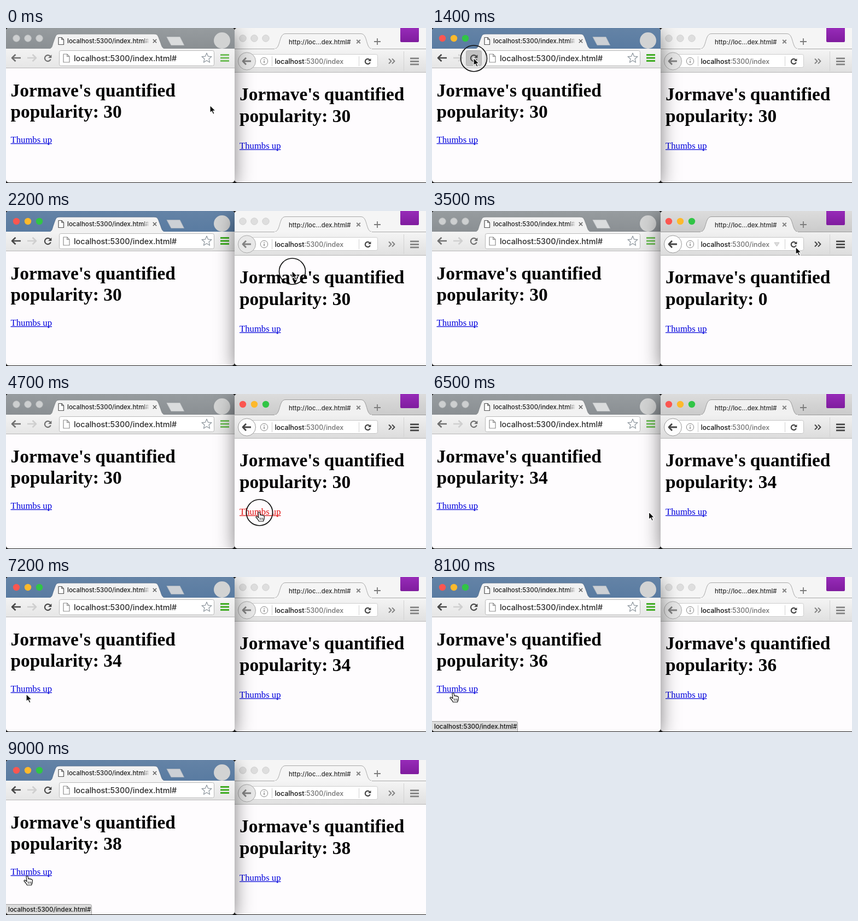
Write an HTML page with a canvas that moves like this. It is 768 px wide and 285 px high and loops after 9100 ms.

```html
<!DOCTYPE html>
<html lang="en">
<head>
<meta charset="utf-8">
<title>Quantified popularity</title>
<style>
html, body { margin: 0; width: 100%; height: 100%; overflow: hidden; background: #222; }
canvas { display: block; width: 768px; height: 285px; }
</style>
</head>
<body>
<canvas id="stage" width="768" height="285"></canvas>
<script>
const g = document.getElementById('stage').getContext('2d');
const LOOP = 9100, STEP = 100;
const UI = 'Inter, Roboto, sans-serif';
const SERIF = '"Liberation Serif", "Times New Roman", serif';
const URL_TEXT = 'localhost:5300/index.html#';
const PAPER = '#fefcfe';

// time, x, y
const PATH = [
  [300, 373, 142], [1000, 76, 55], [1700, 76, 55], [2100, 523, 110],
  [2400, 523, 110], [3200, 665, 66], [3800, 665, 66], [4500, 463, 217],
  [6400, 463, 217], [6800, 37, 215], [7200, 37, 215], [7400, 39, 213]
];
const RIGHT_VOTES = [4700, 5200, 5700, 6200];
const LEFT_VOTES = [7500, 7900, 8300, 8700];
const VOTES = RIGHT_VOTES.concat(LEFT_VOTES);
const PRESSES = [1000, 1400, 2200, 3300, 6800].concat(VOTES);

const within = (t, a, b) => t >= a && t < b;
const pressed = (t, list, len) => list.some(p => within(t, p, p + len));

function pointer(t) {
  if (t <= PATH[0][0]) return PATH[0].slice(1);
  for (let i = 1; i < PATH.length; i++) {
    const [t0, x0, y0] = PATH[i - 1], [t1, x1, y1] = PATH[i];
    if (t <= t1) {
      const u = (t - t0) / (t1 - t0), k = u * u * (3 - 2 * u);
      return [x0 + (x1 - x0) * k, y0 + (y1 - y0) * k];
    }
  }
  return PATH[PATH.length - 1].slice(1);
}

function stateAt(t) {
  const count = 30 + VOTES.filter(p => t >= p + 100).length;
  return {
    t,
    leftOn: within(t, 1100, 2300) || t >= 6900,
    rightOn: within(t, 2300, 6900),
    rightTop: within(t, 2200, 6800),
    leftCount: within(t, 1500, 1700) ? 0 : count,
    rightCount: within(t, 3400, 3700) ? 0 : count,
    hand: within(t, 4500, 6500) || t >= 7300,
    status: t >= 7400
  };
}

function rect(x, y, w, h, fill) {
  g.fillStyle = fill;
  g.fillRect(x, y, w, h);
}

function box(x, y, w, h, r, fill, stroke) {
  g.beginPath();
  g.roundRect(x, y, w, h, r);
  if (fill) { g.fillStyle = fill; g.fill(); }
  if (stroke) { g.strokeStyle = stroke; g.lineWidth = 1; g.stroke(); }
}

function disc(x, y, r, fill, stroke, width = 1) {
  g.beginPath();
  g.arc(x, y, r, 0, Math.PI * 2);
  if (fill) { g.fillStyle = fill; g.fill(); }
  if (stroke) { g.strokeStyle = stroke; g.lineWidth = width; g.stroke(); }
}

function line(points, color, width, cap = 'butt') {
  g.beginPath();
  points.forEach(([x, y], i) => i ? g.lineTo(x, y) : g.moveTo(x, y));
  g.strokeStyle = color;
  g.lineWidth = width;
  g.lineCap = cap;
  g.stroke();
}

function shape(points, fill, stroke, width = 1) {
  g.beginPath();
  points.forEach(([x, y], i) => i ? g.lineTo(x, y) : g.moveTo(x, y));
  g.closePath();
  g.lineJoin = 'round';
  if (fill) { g.fillStyle = fill; g.fill(); }
  if (stroke) { g.strokeStyle = stroke; g.lineWidth = width; g.stroke(); }
}

function text(s, x, y, font, color) {
  g.font = font;
  g.fillStyle = color;
  g.fillText(s, x, y);
}

const ui = size => `500 ${size}px ${UI}`;

function fade(x0, y0, x1, y1, a, b) {
  const f = g.createLinearGradient(x0, y0, x1, y1);
  f.addColorStop(0, a);
  f.addColorStop(1, b);
  return f;
}

function lights(x, on, off, edge) {
  ['#fb5650', '#fdb92c', '#31c546'].forEach((c, i) =>
    disc(x + i * 21, 19, 6.2, on ? c : off, on ? null : edge));
}

function arrow(x, y, dir, color, w, size = 8) {
  line([[x - size * dir, y], [x + size * dir, y]], color, w);
  line([[x + dir * 1.5, y - 6.3], [x + size * dir, y], [x + dir * 1.5, y + 6.3]], color, w);
}

function reload(x, y, r, color) {
  g.beginPath();
  g.arc(x, y, r, 0.35, Math.PI * 1.78);
  g.strokeStyle = color;
  g.lineWidth = 2.2;
  g.lineCap = 'butt';
  g.stroke();
  shape([[x + r + 1.3, y - r - 1], [x + r + 1.3, y - 0.5], [x + 0.5, y - 0.5]], color);
}

function cross(x, y, r, color, w) {
  line([[x - r, y - r], [x + r, y + r]], color, w);
  line([[x - r, y + r], [x + r, y - r]], color, w);
}

function bars(x, y, gap, w, h, color) {
  for (let i = 0; i < 3; i++) rect(x, y + i * gap, w, h, color);
}

function pageIcon(x, y, w, h, color) {
  const f = w * 0.4;
  shape([[x, y], [x + w - f, y], [x + w, y + f], [x + w, y + h], [x, y + h]], '#fff', color, 1.2);
  line([[x + w - f, y], [x + w - f, y + f], [x + w, y + f]], color, 1.1);
}

function star(x, y, r, color) {
  const pts = Array.from({ length: 10 }, (_, i) => {
    const a = -Math.PI / 2 + i * Math.PI / 5, q = i % 2 ? r * 0.45 : r;
    return [x + q * Math.cos(a), y + q * Math.sin(a)];
  });
  shape(pts, '#fff', color, 1.2);
}

function page(x, y1, y2, yLink, count, red) {
  const head = 'bold 33.4px ' + SERIF;
  text("Jormave's quantified", x, y1, head, '#000');
  text('popularity: ' + count, x, y2, head, '#000');
  const color = red ? '#e01010' : '#0000dc';
  text('Thumbs up', x, yLink, '16.7px ' + SERIF, color);
  rect(x, yLink + 1, 75.5, 1.2, color);
}

function frameWindow(x, w, draw) {
  g.save();
  g.shadowColor = 'rgba(0,0,0,.5)';
  g.shadowBlur = 34;
  g.shadowOffsetY = 8;
  box(x, 0, w, 284, 5, PAPER);
  g.restore();
  g.save();
  g.beginPath();
  g.roundRect(x, 0, w, 284, 5);
  g.clip();
  draw();
  g.restore();
}

function leftTab(edge) {
  g.beginPath();
  g.moveTo(77, 38);
  g.bezierCurveTo(85, 38, 84, 33, 87, 25);
  g.bezierCurveTo(91, 14, 91, 11, 98, 11);
  g.lineTo(271, 11);
  g.bezierCurveTo(278, 11, 278, 15, 282, 25);
  g.bezierCurveTo(285, 33, 285, 38, 292, 38);
  g.fillStyle = '#f2f2f2';
  g.fill();
  g.strokeStyle = edge;
  g.lineWidth = 1;
  g.stroke();
}

function leftWindow(s) {
  const on = s.leftOn, ink = on ? '#484848' : '#707070';
  rect(0, 0, 418, 38, on ? fade(0, 0, 0, 38, '#6483a6', '#597ba1') : fade(0, 0, 0, 38, '#979c9f', '#8a8f93'));
  lights(19, on, '#cdcfd0', '#bfc2c3');
  leftTab(on ? '#56708f' : '#83888b');
  pageIcon(96, 17.5, 9.5, 13, '#505050');
  text(URL_TEXT, 112, 28, ui(11.45), fade(250, 0, 262, 0, '#1c1c1c', 'rgba(28,28,28,0)'));
  cross(272, 24, 3.2, '#606060', 1.5);
  shape([[294, 16.5], [318, 16.5], [325.5, 31.5], [302, 31.5]], on ? '#ccd0d5' : '#dadcdd', on ? '#a9b3be' : '#c4c7c9');
  disc(395, 23, 15, '#d2d3d3');

  rect(0, 38, 418, 35, fade(0, 38, 0, 73, '#f3f3f3', '#e6e6e6'));
  rect(0, 73, 418, 1, '#b5b5b5');
  arrow(19, 55, -1, ink, 2.6);
  arrow(47, 55, 1, '#cfcfcf', 2.6);
  if (within(s.t, 1000, 1700)) {
    const down = within(s.t, 1000, 1100) || within(s.t, 1400, 1500);
    box(62.5, 41.5, 28, 28, 3, down ? '#c3c3c3' : '#e2e2e2', '#b0b0b0');
  }
  reload(76.5, 55.5, 5.6, ink);
  box(97.5, 41.5, 283, 28, 3, '#fff', '#b8b8b8');
  pageIcon(105, 48, 11, 15, '#8b8b8b');
  text(URL_TEXT, 124, 61, ui(14.3), '#2c2c2c');
  star(367, 55.5, 9.5, '#8c959c');
  bars(392, 48, 5.5, 16, 3, on ? '#3dab20' : '#6fbd58');

  page(8.5, 126, 165, 211, s.leftCount, pressed(s.t, LEFT_VOTES, 200));
  if (s.status) {
    box(-4.5, 265.5, 161, 24, 3, '#dcdcdc', '#a0a0a0');
    text(URL_TEXT, 4, 279, ui(11.5), '#111');
  }
}

function rightTab(fill, edge) {
  g.beginPath();
  g.moveTo(490, 38.5);
  g.bezierCurveTo(503, 38.5, 498, 10.5, 511, 10.5);
  g.lineTo(649, 10.5);
  g.bezierCurveTo(662, 10.5, 657, 38.5, 670, 38.5);
  g.fillStyle = fill;
  g.fill();
  g.strokeStyle = edge;
  g.lineWidth = 1;
  g.stroke();
}

function rightWindow(s) {
  const on = s.rightOn, ink = on ? '#444' : '#828282';
  const edge = on ? '#999' : '#a8a8a8';
  const tabFill = on ? '#f1f1f1' : '#f5f5f5';
  rect(418, 0, 350, 38, on ? fade(0, 0, 0, 38, '#dcdcdc', '#cbcbcb') : '#f5f5f5');
  rect(418, 38, 350, 43, fade(0, 38, 0, 81, tabFill, on ? '#dcdcdc' : '#e0e0e0'));
  rect(418, 38, 350, 1, edge);
  lights(433, on, '#dedede', '#d0d0d0');
  rightTab(tabFill, edge);
  rect(491, 38, 178, 1, tabFill);
  text('http://loc…dex.html#', 517, 29.5, ui(11.3), '#2c2c2c');
  cross(644.5, 25, 3.3, '#858585', 2);
  line([[673, 25], [685, 25]], '#7c7c7c', 1.8);
  line([[679, 19], [679, 31]], '#7c7c7c', 1.8);
  box(721, -4, 34, 30, 2, fade(0, 0, 0, 26, '#972bb8', '#7f1c9e'));

  rect(418, 81, 350, 1, '#b5b5b5');
  box(448.5, 48.5, 231, 24, 3, '#fff', on ? '#c5c5c5' : '#cdcdcd');
  disc(440.5, 61, 16, on ? '#fdfdfd' : '#e8e8e8', edge);
  arrow(440.5, 61, -1, ink, 2.8, 7.5);
  disc(472, 61, 6.7, null, '#858585');
  rect(471.3, 60, 1.5, 4.5, '#858585');
  rect(471.3, 57, 1.5, 1.6, '#858585');
  rect(486, 52, 1, 18, '#c8c8c8');
  const font = ui(12.4), host = 'localhost';
  text(host, 491.5, 65.5, font, '#111');
  text(':5300/index', 491.5 + g.measureText(host).width, 65.5, font, '#707070');
  if (within(s.t, 2500, 3900)) shape([[626, 58], [635, 58], [630.5, 65]], '#ddd', '#c5c5c5');
  rect(645, 52, 1, 18, '#d0d0d0');
  reload(661.5, 61.5, 4.6, '#444');
  for (const x of [700, 706]) line([[x, 56.5], [x + 4.5, 61], [x, 65.5]], ink, 2);
  rect(727, 43, 1, 36, '#d2d2d2');
  bars(739, 54.5, 5.5, 16, 2.8, ink);

  page(427, 133, 173, 222, s.rightCount, pressed(s.t, RIGHT_VOTES, 200));
}

function arrowCursor(x, y) {
  shape([[0, 0], [0, 14], [3.2, 11.2], [5.7, 16.6], [8.2, 15.5], [5.8, 10.3], [10, 10.1]]
    .map(([a, b]) => [x + a, y + b]), '#111', '#fff', 1.2);
}

function handCursor(x, y) {
  g.save();
  g.translate(x, y);
  g.beginPath();
  g.moveTo(-2, 1);
  g.quadraticCurveTo(-0.5, -1, 1, 1);
  g.lineTo(2, 6);
  g.quadraticCurveTo(3.5, 4, 4.8, 6.3);
  g.quadraticCurveTo(6.5, 4.7, 7.5, 7);
  g.quadraticCurveTo(9, 6, 9.5, 8.5);
  g.quadraticCurveTo(9.6, 12, 7.5, 17);
  g.lineTo(-0.5, 17);
  g.quadraticCurveTo(-2.5, 13, -6, 9.5);
  g.quadraticCurveTo(-5.8, 7, -3.5, 8.3);
  g.lineTo(-1, 10.5);
  g.closePath();
  g.fillStyle = '#fff';
  g.fill();
  g.strokeStyle = '#111';
  g.lineWidth = 1.2;
  g.lineJoin = 'round';
  g.stroke();
  g.restore();
  for (const a of [1.5, 4, 6.5]) line([[x + a, y + 10.5], [x + a, y + 14.5]], '#222', 1);
}

function draw(t) {
  const s = stateAt(t);
  rect(0, 0, 768, 285, '#242424');
  const left = () => frameWindow(0, 418, () => leftWindow(s));
  const right = () => frameWindow(418, 360, () => rightWindow(s));
  if (s.rightTop) { left(); right(); } else { right(); left(); }

  const [x, y] = pointer(t);
  if (pressed(t, PRESSES, 100)) disc(x + 0.5, y + 1, 24, null, '#111', 1.7);
  if (s.hand) handCursor(x, y); else arrowCursor(x, y);
}

const start = performance.now();
function tick() {
  const t = (performance.now() - start) % LOOP;
  draw(Math.floor(t / STEP) * STEP);
  requestAnimationFrame(tick);
}
tick();
</script>
</body>
</html>
```
